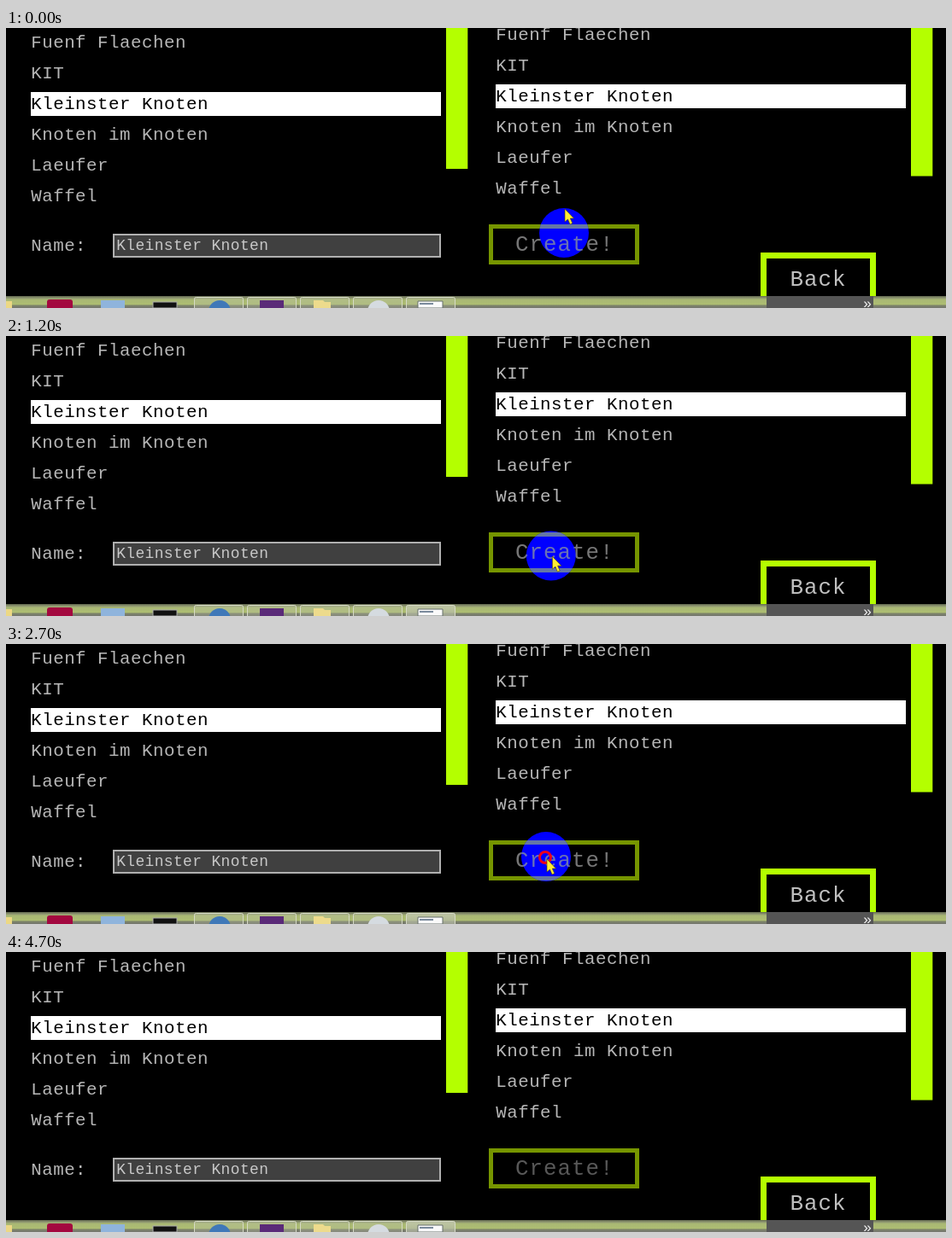
An HTML page that plays this animation: 1100x328 px, repeating every 4800 ms.

```html
<!DOCTYPE html>
<html lang="de">
<head>
<meta charset="utf-8">
<title>Knoten</title>
<style>
html, body { margin: 0; width: 100%; height: 100%; overflow: hidden; background: #000; }
svg { display: block; width: 1100px; height: 328px; }
text { font-family: "Liberation Mono", monospace; font-size: 20.8px; letter-spacing: .024em; fill: #b6b6b6; white-space: pre; }
.field { font-size: 17.9px; letter-spacing: .022em; fill: #c8c8c8; }
.button { font-size: 25.8px; letter-spacing: .04em; }
</style>
</head>
<body>
<svg viewBox="0 0 1100 328">
  <defs>
    <linearGradient id="bar" x1="0" y1="0" x2="0" y2="1">
      <stop offset="0" stop-color="#62684f"/>
      <stop offset=".16" stop-color="#8d9570"/>
      <stop offset=".3" stop-color="#a9b874"/>
      <stop offset=".68" stop-color="#adbd72"/>
      <stop offset=".8" stop-color="#7c8269"/>
      <stop offset="1" stop-color="#74766f"/>
    </linearGradient>
    <linearGradient id="tab" x1="0" y1="0" x2="0" y2="1">
      <stop offset="0" stop-color="#c9cfb4"/>
      <stop offset="1" stop-color="#a3a896"/>
    </linearGradient>
    <clipPath id="spot"><circle id="hole" r="29"/></clipPath>
  </defs>
  <rect width="1100" height="328"/>
  <g id="lists"></g>

  <text x="29.2" y="261">Name:</text>
  <rect x="126" y="242" width="382" height="26" fill="#404040" stroke="#b0b0b0" stroke-width="2"/>
  <text class="field" x="129.2" y="260">Kleinster Knoten</text>

  <rect x="567.5" y="232.5" width="171" height="42" fill="none" stroke="#769500" stroke-width="5"/>
  <text id="create" class="button" x="596" y="260.5">Create!</text>
  <g clip-path="url(#spot)">
    <rect x="565" y="205" width="180" height="123" fill="#00f"/>
    <rect x="567.5" y="232.5" width="171" height="42" fill="none" stroke="#6476a6" stroke-width="5"/>
    <text class="button" x="596" y="260.5" style="fill:#6a72b4">Create!</text>
  </g>

  <path d="M886.5 328V266.500H1014.500V328" fill="none" stroke="#b4ff00" stroke-width="7"/>
  <text class="button" x="917.5" y="302" style="fill:#c0c0c0">Back</text>

  <circle id="ring" r="6.500" fill="none" stroke="#f00018" stroke-width="3"/>
  <path id="arrow" d="M0 0V15L3.500 12L6 18L8.800 16.800L6.300 11H10.500Z" fill="#ffec35" stroke="#4a4400" stroke-width=".6"/>

  <g id="taskbar">
    <rect y="314" width="1100" height="14" fill="url(#bar)"/>
    <rect x="890" y="314" width="125" height="14" fill="#555"/>
    <text x="1003" y="328" style="font-size:17px;fill:#eee">»</text>
    <g id="tabs"></g>
    <rect y="320" width="7" height="8" fill="#ecd884"/>
    <rect x="48" y="318" width="30" height="14" rx="3" fill="#a3083f"/>
    <rect x="111" y="319" width="28" height="9" fill="#8fb4dc"/>
    <rect x="172" y="321" width="28" height="7" fill="#111" stroke="#aaa"/>
    <circle cx="250" cy="332" r="13" fill="#3f78b8"/>
    <rect x="297" y="319" width="28" height="9" fill="#5a2a78"/>
    <path d="M360 328V319H371L373 321H380V328Z" fill="#eddb8c"/>
    <circle cx="436" cy="332" r="13" fill="#d5dbe0"/>
    <path d="M482 328V320H511V328Z" fill="#fafafa" stroke="#66706c"/>
    <path d="M484 323H500" stroke="#7a8a9c" stroke-width="2"/>
  </g>
</svg>
<script>
const LOOP = 4800, STEP = 100;
const NS = "http://www.w3.org/2000/svg";
const get = id => document.getElementById(id);

function add(parent, tag, attrs, label) {
  const el = document.createElementNS(NS, tag);
  for (const k in attrs) el.setAttribute(k, attrs[k]);
  if (label) el.textContent = label;
  get(parent).appendChild(el);
  return el;
}

const knots = ["Fuenf Flaechen", "KIT", "Kleinster Knoten", "Knoten im Knoten", "Laeufer", "Waffel"];

function drawList(x, top, barEnd) {
  add("lists", "rect", { x, y: top + 52, width: 480, height: 28, fill: "#fff" });
  add("lists", "rect", { x: x + 486, y: 0, width: 25.3, height: barEnd, fill: "#b4ff00" });
  knots.forEach((name, i) => add("lists", "text",
    { x: x + 0.2, y: top + 36 * i, style: i === 2 ? "fill:#000" : "" }, name));
}
drawList(29, 23, 165);
drawList(573, 14, 173.5);

const tabs = [220, 282, 344, 406, 468].map(x => add("tabs", "rect",
  { x: x + 0.5, y: 315.5, width: 57, height: 16, rx: 2, fill: "url(#tab)", stroke: "#d6dac6", "fill-opacity": 0.3 }));

// time, halo x, halo y, arrow tip x, arrow tip y
const path = [
  [0, 653, 240, 654, 212],
  [400, 648, 253, 651, 250],
  [900, 648, 257, 650, 255],
  [1600, 622, 258, 623, 263],
  [2700, 632, 249, 633, 252],
  [3500, 640, 252, 641, 253],
  [3700, 641, 254, 642, 256],
  [4200, 656, 343, 657, 347],
  [4400, 657, 364, 658, 368]
];

function poseAt(t) {
  const i = path.findIndex(p => p[0] > t);
  if (i < 0) return path[path.length - 1];
  const a = path[i - 1], b = path[i];
  const u = (t - a[0]) / (b[0] - a[0]);
  const e = u * u * (3 - 2 * u);
  return a.map((v, k) => v + (b[k] - v) * e);
}

function place(id, x, y) {
  get(id).setAttribute("transform", `translate(${x.toFixed(2)} ${y.toFixed(2)})`);
}

function render(ms) {
  const t = Math.floor((ms % LOOP) / STEP) * STEP;
  const [, hx, hy, ax, ay] = poseAt(t);
  place("hole", hx, hy);
  place("arrow", ax, ay);
  place("ring", hx - 1, hy + 1);
  get("ring").setAttribute("visibility", t >= 2500 && t < 3700 ? "visible" : "hidden");
  // The label dims once the pointer has left the button.
  get("create").style.fill = t < 4200 ? "#767676" : "#585858";
  tabs[4].setAttribute("fill-opacity", t < 700 ? 0.3 : 0.75);
}

const start = performance.now();
function tick() {
  render(performance.now() - start);
  requestAnimationFrame(tick);
}
tick();
</script>
</body>
</html>
```
